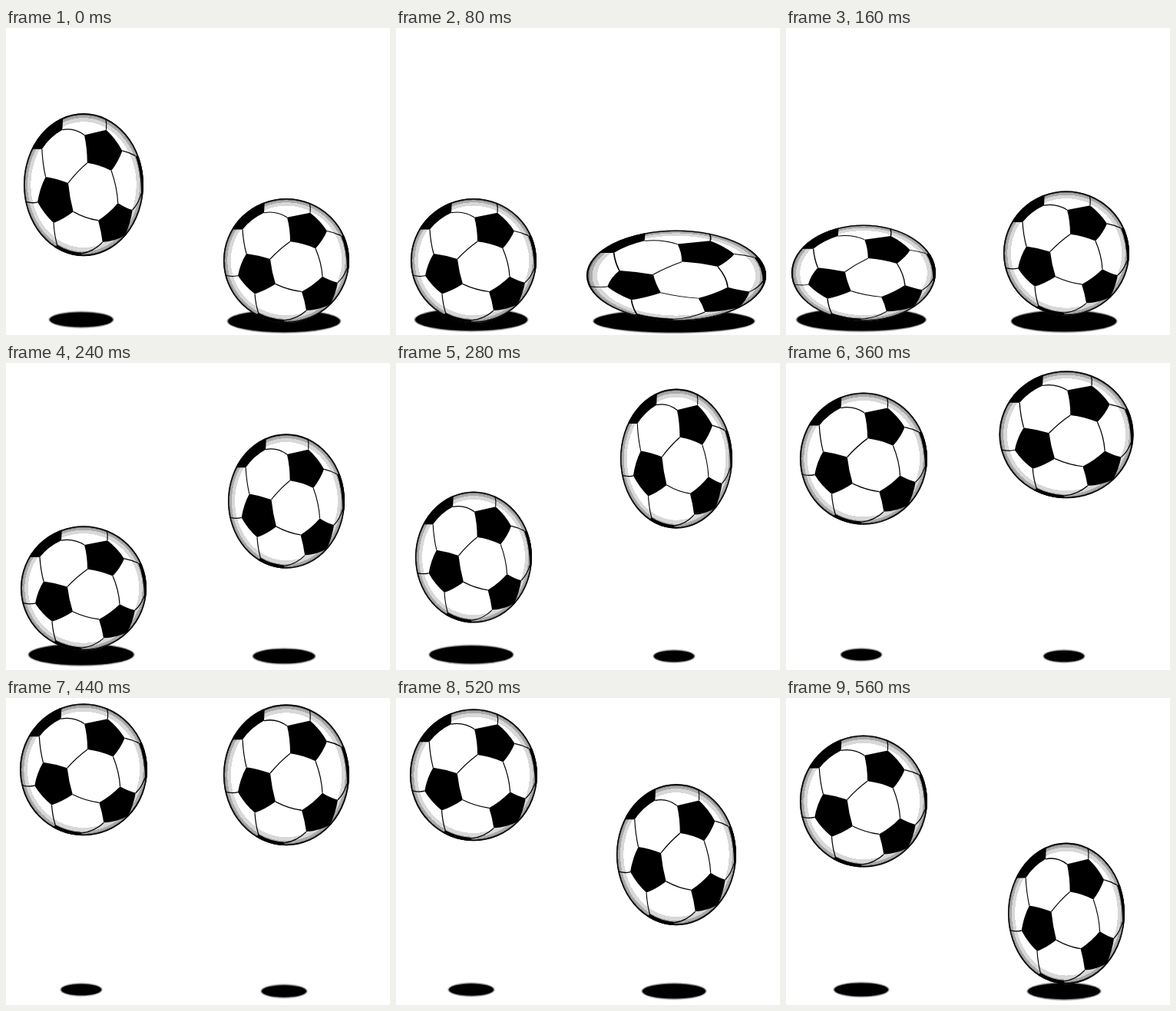
An HTML page with a canvas that plays this animation: 500x400 px, repeating every 0.6 s.

```html
<!DOCTYPE html>
<html lang="en">
<head>
<meta charset="utf-8">
<title>Bouncing footballs</title>
<style>
  html, body { margin: 0; width: 100%; height: 100%; overflow: hidden; background: #fff; }
  canvas { display: block; }
</style>
</head>
<body>
<canvas id="stage" width="500" height="400"></canvas>
<script>
const ctx = document.getElementById('stage').getContext('2d');
const STEP = 40, STEPS = 15, R = 82;
const CONTACT = 4, APEX = 9.7, TOP = 93;

// Squash is the pose in mid-contact, stretch the poses in flight: [step, x radius, y radius]
const balls = [
  { x: 101, shadowX: 98, shadowY: 380, delay: 2, squash: [2, 94, 62.5],
    stretch: [[5, 76, 85.5], [7, 83, 86], [12, 83, 86], [13, 78, 93]] },
  { x: 365, shadowX: 362, shadowY: 382, delay: 0, squash: [2, 117, 59],
    stretch: [[7, 73, 91], [9, 87.5, 83], [11, 82, 92], [14, 76, 92]] }
];

const patches = new Path2D(`
  M1-57 31-63 Q44-53 53-39 Q48-27 38-16 Q22-23 5-25 Q5-42 1-57Z
  M-52-9 Q-37-7-21-2 Q-19 15-14 31 Q-28 40-41 44 Q-54 34-63 20 Q-60 4-52-9Z
  M20 41 Q35 33 47 21 Q58 27 67 29 Q64 45 57 58 Q43 65 26 66 Q24 53 20 41Z
  M-28-82 -29-63 Q-46-55-57-41 L-82-41 -82-82Z
  M71-33 Q79-15 79 14 L84 14 84-33Z
  M-36 69 Q-21 77-3 78 L-3 84 -46 76Z`);

const seams = new Path2D(`
  M-29-63 Q-13-66 1-57 M31-63 Q32-70 30-77 M53-39 Q63-37 71-33
  M-57-41 Q-56-24-52-9 M5-25 Q-9-15-21-2 M38-16 Q46 3 47 21
  M-14 31 Q3 39 20 41 M67 29 Q75 22 79 10 M-63 20 Q-72 22-81 19
  M-41 44 Q-40 58-36 70 M26 66 Q14 77-3 79`);

const shade = ctx.createRadialGradient(0, 0, 0, 0, 0, R);
[['#fff', 0, .88], ['#d8d8d8', .88, .935], ['#aaa', .935, .97], ['#777', .97, 1]]
  .forEach(([color, from, to]) => {
    shade.addColorStop(from, color);
    shade.addColorStop(to, color);
  });

const mix = (a, b, p) => a + (b - a) * p;

function ellipse(x, y, rx, ry, fill) {
  ctx.beginPath();
  ctx.ellipse(x, y, rx, ry, 0, 0, 2 * Math.PI);
  ctx.fillStyle = fill;
  ctx.fill();
}

function radiiAt({ squash, stretch }, t) {
  const round = step => [step, R, R - 1];
  const keys = [round(0), squash, round(CONTACT), ...stretch, round(STEPS)];
  const i = keys.findIndex(key => key[0] > t);
  const [a, b] = [keys[i - 1], keys[i]];
  const p = (t - a[0]) / (b[0] - a[0]);
  return [mix(a[1], b[1], p), mix(a[2], b[2], p)];
}

// On the ground the underside lifts slowly; in the air the ball eases to and from the apex
function heightAt(t, ry) {
  if (t <= CONTACT) return 384 - .6 * t * t - ry;
  const [low, span, power] = t < APEX ? [292.5, APEX - CONTACT, 1.8] : [303, 5, 1.58];
  const u = (Math.abs(t - APEX) / span) ** power;
  return mix(TOP, low, Math.sin(u * Math.PI / 2) ** 2);
}

function shadowAt(t, rx) {
  return t < CONTACT ? rx * .9 : Math.max(27, 125 - 14 * t, 6 * t - 36);
}

function drawShadow(x, y, width) {
  const height = Math.min(15.5, 4.2 + width * .15);
  [['#ccc', -1], ['#777', 0], ['#000', 1]]
    .forEach(([color, inset]) => ellipse(x, y, width - inset, height - inset, color));
}

function drawBall(x, y, rx, ry) {
  ctx.save();
  ctx.translate(x, y);
  ctx.scale(rx / R, ry / R);
  ellipse(0, 0, R, R, shade);
  ctx.save();
  ctx.clip();
  ctx.fillStyle = '#000';
  ctx.fill(patches);
  ctx.lineWidth = 1.2;
  ctx.stroke(seams);
  ctx.restore();
  ctx.beginPath();
  ctx.arc(0, 0, R - .7, 0, 2 * Math.PI);
  ctx.lineWidth = 1.5;
  ctx.stroke();
  ctx.restore();
}

function draw(now) {
  const step = Math.floor(now / STEP) % STEPS;
  ctx.fillStyle = '#fff';
  ctx.fillRect(0, 0, 500, 400);
  for (const ball of balls) {
    const t = (step - ball.delay + STEPS) % STEPS;
    const [rx, ry] = radiiAt(ball, t);
    drawShadow(ball.shadowX, ball.shadowY, shadowAt(t, rx));
    drawBall(ball.x, heightAt(t, ry), rx, ry);
  }
}

const start = performance.now();
function loop() {
  draw(performance.now() - start);
  requestAnimationFrame(loop);
}
loop();
</script>
</body>
</html>
```
